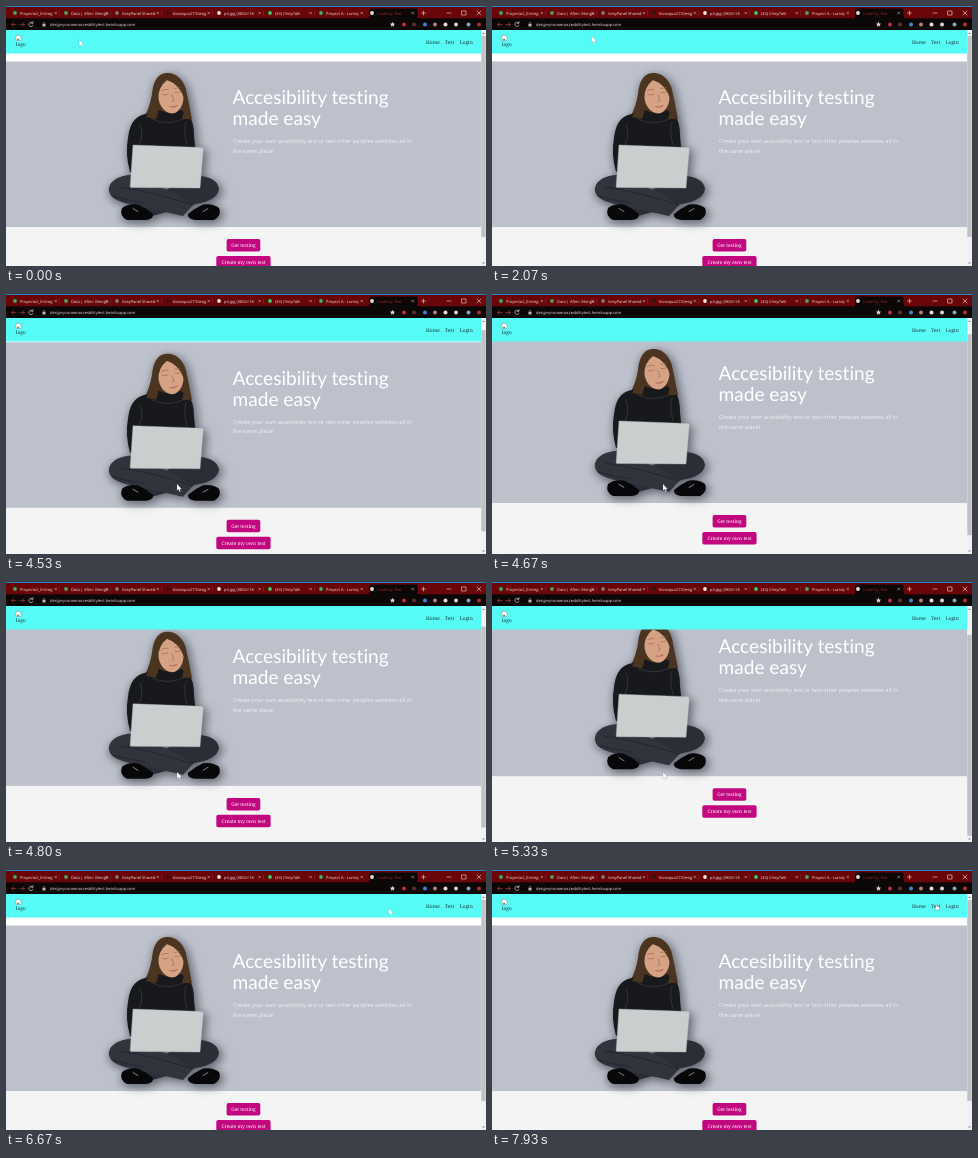
Recreate the animation shown at these times as an HTML page. Size 480x260 px, loop 8000 ms.

```html
<!DOCTYPE html>
<html lang="en">
<head>
<meta charset="utf-8">
<title>Accesibility testing</title>
<style>
  html, body { margin: 0; width: 100%; height: 100%; overflow: hidden; background: #f4f4f4; }
  svg { display: block; width: 480px; height: 260px; }
  text { text-rendering: geometricPrecision; white-space: pre; }
  .ui { font: 4px "Open Sans", "Noto Sans", sans-serif; fill: #e9dede; }
  .serif { font: 4.85px "Noto Serif", serif; }
  .title { font: 19.1px Lato, sans-serif; font-variant-ligatures: none; fill: #fff; }
  .lead { font: 5.63px "Open Sans", "Noto Sans", sans-serif; fill: #fff; opacity: .78; }
  .button rect { fill: #c2087f; }
  .button text { fill: #fff; text-anchor: middle; }
  .figure { filter: drop-shadow(4px 2px 4px rgba(50, 52, 62, .5)) drop-shadow(-2px 3px 3px rgba(50, 52, 62, .3)); }
  .line { fill: none; stroke-linecap: round; stroke-linejoin: round; }
</style>
</head>
<body>
<svg viewBox="0 0 480 260" xmlns="http://www.w3.org/2000/svg">
  <rect width="480" height="260" fill="#f4f4f4"/>

  <g id="page">
    <rect y="20" width="475" height="36" fill="#fff"/>
    <rect y="55.5" width="475" height="165.5" fill="#bdc1cb"/>

    <g class="figure">
      <!-- hair behind -->
      <path fill="#4c3520" d="M160 67C150 68 147 78 146 88Q144 100 139 110L150 115L178 115L186 113C184 104 183 97 181 89C180 77 172 66 160 67Z"/>
      <!-- sweater -->
      <path fill="#18191c" d="M153 104Q164 110 175 104L183 110Q188 116 188 130L191 160L124 166Q119 148 122 132Q124 113 136 109Z"/>
      <path class="line" stroke="#4a4d54" stroke-width=".5" d="M134 118Q138 129 133 139M180 116Q177 126 181 139M146 113Q161 121 180 112"/>
      <!-- face -->
      <path fill="#d6a286" d="M158 74C153 79 151 87 153 95C155 103 161 107.500 167 107.500C174 106 178 98 177.500 89C176 80 168 74 158 74Z"/>
      <path fill="#4c3520" d="M159 68Q150 73 148 87Q146 101 140 111L150 113Q154 104 152 94Q152 81 161 74Q173 78 178 92Q179 104 176 113L185 113Q183 104 181 91C180 77 171 67 159 68Z"/>
      <path class="line" stroke="#8d634c" stroke-width=".6" d="M156 88.500Q159 90 162 88M169 86.500Q172 87.500 175 85.500M155.500 84.500Q159 82.500 162 83.500M168.500 82.500L174.500 81.500M166 89L168 94.500L166 95.500"/>
      <path class="line" stroke="#b8695e" stroke-width="1.200" d="M164 100.500Q167.500 102 171 99.500"/>
      <!-- crossed legs -->
      <path fill="#2b2e36" d="M187 170C201 169 212 174 213 183C212 191 203 196 190 198L146 210L130 200Q146 188 160 184Z"/>
      <path fill="#31343d" d="M126 169C112 169 102 176 103 185C104 193 116 197 128 199L177 210L187 199L170 188Z"/>
      <path class="line" stroke="#202228" stroke-width=".8" d="M113 181Q143 185 187 199M106 190Q124 195 139 197"/>
      <!-- shoes -->
      <g id="shoe">
        <path fill="#08080a" d="M116 202Q122 197 132 198.500Q140 202 147 208Q148 213 140 214L121 214Q113 210 116 202Z"/>
        <path class="line" stroke="#b9babd" stroke-width=".7" d="M127 202.500L132 205.500"/>
      </g>
      <use href="#shoe" transform="matrix(-1 0 0 1 329 0)"/>
      <!-- laptop -->
      <path fill="#c9cfcf" stroke="#aeb5b7" stroke-width=".4" stroke-linejoin="round" d="M127 139L196 141.500Q197.500 142 197.300 143.500L194 182L125 181.500Q124 181.500 124.200 180Z"/>
    </g>

    <text class="title" x="226.500" y="98">Accesibility testing</text>
    <text class="title" x="226.500" y="119">made easy</text>
    <text class="lead" x="227" y="137">Create your own accesibility test or test other peoples websites all in</text>
    <text class="lead" x="227" y="146.700">the same place!</text>

    <g class="button serif">
      <rect x="220.600" y="233.100" width="33.700" height="12.500" rx="1.800"/>
      <text x="237.500" y="241.200">Get testing</text>
      <rect x="210.300" y="250" width="54.300" height="12.500" rx="1.800"/>
      <text x="237.500" y="258">Create my own test</text>
    </g>
  </g>

  <!-- site navigation -->
  <rect y="24" width="475" height="23.500" fill="#57fbf6"/>
  <g class="serif" fill="#18363a">
    <path fill="#fff" stroke="#7d8f95" stroke-width=".5" d="M10 29.500H13.500L15 31V34.500H10Z"/>
    <path fill="#5ba657" d="M10.400 34.200L12 32.200L14 34.200Z"/>
    <text x="10" y="40">logo</text>
    <text x="420" y="37.700">Home</text>
    <text x="439" y="37.700">Test</text>
    <text x="453.700" y="37.700">Login</text>
  </g>

  <!-- scrollbar -->
  <rect x="475" y="24" width="5" height="236" fill="#f1f1f1"/>
  <path fill="#777" d="M476.200 28L477.500 26.500L478.800 28ZM476.200 256.500L477.500 258L478.800 256.500Z"/>
  <rect id="thumb" x="475.300" y="30" width="4.400" height="201" fill="#c1c1c1"/>

  <!-- browser window -->
  <rect width="480" height="13" fill="#6a0609"/>
  <rect width="480" height="1" fill="#2585c6"/>
  <rect y="12.300" width="480" height="11.700" fill="#0c0808"/>
  <path fill="#0c0808" d="M361 13Q363 12 363 10.500V4Q363 2.500 364.500 2.500H410Q411.500 2.500 411.500 4V10.500Q411.500 12 413.500 13Z"/>
  <g id="tabs" class="ui"></g>
  <path class="line" stroke="#eadede" stroke-width=".6" d="M415.500 7H419.500M417.500 5V9M441 7H445M456 5H460V9H456ZM471 5L475 9M475 5L471 9"/>
  <path class="line" stroke="#c9c3c4" stroke-width=".7" d="M26.500 16.800A2.200 2.200 0 1 0 27 19.300M27 15.700V17.300H25.300"/>
  <path class="line" stroke="#a8383c" stroke-width=".7" d="M10 18.500H5.500L7.500 16.500M5.500 18.500L7.500 20.500M14 18.500H18.500L16.500 16.500M18.500 18.500L16.500 20.500"/>
  <path fill="#bdb7b8" d="M36.500 18H39.500V20.500H36.500Z"/>
  <path class="line" stroke="#bdb7b8" stroke-width=".5" d="M37 18V17Q38 15.500 39 17V18"/>
  <text class="ui" x="44" y="20">designyourownaccesbilitytest.herokuapp.com</text>
  <path fill="#d8d2d3" d="M386.500 15.800L387.300 17.600L389.200 17.800L387.700 19L388.200 20.800L386.500 19.800L384.800 20.800L385.300 19L383.800 17.800L385.700 17.600Z"/>
  <g id="extensions"></g>

  <g id="cursor">
    <path id="arrow" fill="#fff" stroke="#55595c" stroke-opacity=".45" stroke-width=".4" stroke-linejoin="round" d="M0 0V6.600L1.500 5.300L2.600 7.700L3.700 7.200L2.700 4.900H4.700Z"/>
    <path id="hand" fill="#fff" stroke="#3c484a" stroke-opacity=".6" stroke-width=".4" stroke-linejoin="round" d="M-.5 .3Q0 -.3 .5 .3V2.200L3 2.800Q3.500 3 3.300 4L2.700 6H0L-1.800 3.600Q-1.500 2.800 -.5 3.600Z"/>
  </g>
</svg>

<script>
const LOOP = 8000;
const FPS = 15;
const MAX_SCROLL = 27;
const get = id => document.getElementById(id);

function add(parent, name, attrs, text = "") {
  const node = document.createElementNS("http://www.w3.org/2000/svg", name);
  for (const key in attrs) node.setAttribute(key, attrs[key]);
  node.textContent = text;
  parent.append(node);
}

// [icon colour, title]
const tabs = [
  ["#3fae62", "Proyecto2_Entreg"],
  ["#4aa552", "Data | After: Mongo"],
  ["#77777c", "GreyPanel Shared"],
  ["#2b1719", "blvasquo27/Desig"],
  ["#e8e3e3", "p4.jpg (3802×18"],
  ["#3ccb62", "(43) ChirpTalk"],
  ["#3fae62", "Proyect A - Lumiq"],
  ["#e4e0e0", "Usability Test"]
];
tabs.forEach(([color, title], i) => {
  const x = 9 + i * 51;
  const active = i === tabs.length - 1;
  add(get("tabs"), "circle", { cx: x, cy: 7, r: 1.9, fill: color });
  add(get("tabs"), "text", { x: x + 5, y: 8.5, style: active ? "fill:#a3222b" : "" }, title);
  const end = x + 39.5;
  add(get("tabs"), "path", {
    d: `M${end} 5.800l2.400 2.400m0 -2.400l-2.400 2.400`, stroke: "#d9c4c5", "stroke-width": .5
  });
  if (i < 6) add(get("tabs"), "path", { d: `M${end + 5} 4.500v5`, stroke: "#963c42", "stroke-width": .4 });
});

[[398, "#c22f31"], [408, "#5a3236"], [419, "#3f83d8"], [429, "#b08085"], [439.5, "#e3dfe0"],
 [450, "#d5d2d3"], [462.5, "#7fa9c4"], [473, "#b52d32"]]
  .forEach(([cx, fill]) => add(get("extensions"), "circle", { cx, cy: 18.5, r: 2, fill }));

// Keys are [time, ...values]
const scrollKeys = [[4333, 0], [4667, 12], [4900, 21], [5133, MAX_SCROLL], [5333, MAX_SCROLL], [5533, 0]];
const cursorKeys = [
  [2000, 73, 33.5], [2066, 99, 30], [2200, 165, 36], [2400, 305, 82], [2533, 346, 107.5],
  [3666, 346, 107.5], [3667, 171, 190],
  [6133, 171, 190], [6333, 205, 160], [6533, 310, 80], [6733, 418, 18],
  [7000, 449, 32.5], [7333, 466, 34], [7600, 458, 34], [7867, 446, 34], [7933, 444.3, 34]
];

function sample(keys, t) {
  const next = keys.findIndex(key => key[0] > t);
  if (next === 0) return keys[0].slice(1);
  if (next < 0) return keys[keys.length - 1].slice(1);
  const a = keys[next - 1], b = keys[next];
  const part = (t - a[0]) / (b[0] - a[0]);
  return a.slice(1).map((v, i) => v + (b[i + 1] - v) * part);
}

function draw(now) {
  const t = Math.floor((now % LOOP + 5) * FPS / 1000) * 1000 / FPS + 1;
  const [scroll] = sample(scrollKeys, t);
  const [x, y] = sample(cursorKeys, t);
  const onLink = y > 31 && y < 40 && (x > 438 && x < 450 || x > 453 && x < 468);
  get("page").setAttribute("transform", `translate(0 ${-scroll})`);
  get("thumb").setAttribute("y", 30 + scroll * 23 / MAX_SCROLL);
  get("cursor").setAttribute("transform", `translate(${x} ${y})`);
  get("arrow").style.display = onLink ? "none" : "";
  get("hand").style.display = onLink ? "" : "none";
}

const start = performance.now();
function tick() {
  draw(performance.now() - start);
  requestAnimationFrame(tick);
}
tick();
</script>
</body>
</html>
```
